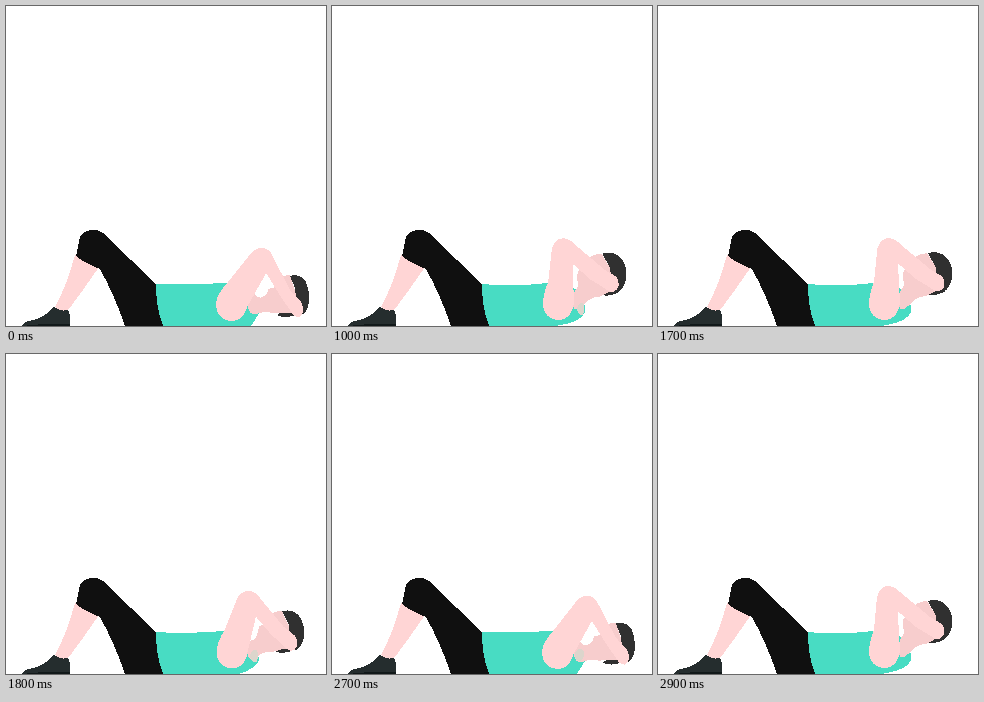
These frames come from a looping animation (320x320 px, 3.8 s). An HTML page:

```html
<!DOCTYPE html>
<html lang="en">
<meta charset="utf-8">
<title>Crunches</title>
<style>
  html, body { margin: 0; height: 100%; overflow: hidden; background: #fff; }
  svg { display: block; width: 100vw; height: 100vh; shape-rendering: crispEdges; }
</style>
<svg viewBox="0 0 320 320">
  <g id="body"></g>
  <path fill="#252d2e" d="M16 319Q20 315 27 314Q35 312 40 308L48 300Q52 306 62 303Q65 311 64 320H16Z"/>
  <path fill="#111819" d="M16 320Q40 317 64 318V320Z"/>
  <path fill="#ffd5d5" d="M69 249L93 261Q78 283 63 303Q56 307 49 301Q61 279 69 249Z"/>
  <path fill="#101010" d="M70 250L74 231Q78 224 88 224Q95 224 100 230L150 278Q150 302 157 320H119Q108 288 94 263Q80 258 70 250Z"/>
</svg>
<script>
const LOOP = 3800;
const skin = '#ffd5d5', face = '#f7cdcd', cap = '#303030';

// fill, path lying down, path curled up, shown only while moving
const parts = [
  [cap,
    'M271 309Q276 304 285 306L290 309Q278 313 271 309Z',
    'M268 288Q274 281 283 282L287 285Q277 291 268 288Z'],
  ['#48dcc3',
    'M149 278Q185 279 218 277Q235 276 241 286Q252 300 253 307Q249 314 245 320L157 320Q149 303 149 278Z',
    'M149 278Q182 281 216 277Q236 276 243 283Q253 288 253 306Q248 317 222 320L157 320Q149 303 149 278Z'],
  [face,
    'M242 300Q243 290 249 288Q253 294 258 290Q262 288 262 283L270 281Q272 269 284 269L291 290L286 307Q275 306 267 307Q257 305 251 308Q243 310 242 300Z',
    'M241 300Q240 290 243 284Q248 279 245 274Q244 268 246 264L252 258Q257 247 269 247L279 263L281 283Q274 287 268 290Q260 290 253 297Q243 308 241 300Z'],
  [cap,
    'M284 270Q294 267 300 276Q305 288 302 301Q300 307 294 310L291 300L289 282Z',
    'M270 247Q278 244 286 249Q296 257 294 272Q292 282 285 286L279 280L278 262Z'],
  ['#dcd5cc',
    'M243 300Q244 294 250 295Q254 299 250 306Q243 309 243 300Z',
    'M245 302Q247 296 251 297Q254 302 251 309Q246 310 245 302Z', true],
  [skin,
    'M250 246Q258 238 265 247L284 284L295 296Q300 305 294 311Q288 312 284 304L275 291L257 262Z',
    'M226 236Q234 229 242 238L272 263L284 270Q289 279 284 283Q279 288 273 282L258 273L236 254Z'],
  [skin,
    'M210 297Q211 288 222 276L246 246Q256 238 264 246Q268 252 262 264L241 301Q238 314 226 315Q210 314 210 297Z',
    'M211 298Q211 288 216 276L218 243Q222 228 238 234Q239 246 240 264L242 296Q240 313 227 314Q212 313 211 298Z'],
];

// start time, curl amount, moving
const steps = [
  [0, 0, 0],
  [800, .02, 1], [900, .5, 1], [1000, .97, 1], [1100, .99, 0], [1200, 1, 0],
  [1700, .99, 0], [1800, .55, 1], [1900, .1, 1], [2000, 0, 0],
  [2700, .02, 1], [2800, .55, 1], [2900, 1, 0],
];

const body = document.getElementById('body');
const paths = parts.map(([fill]) => {
  const path = document.createElementNS('http://www.w3.org/2000/svg', 'path');
  path.setAttribute('fill', fill);
  return body.appendChild(path);
});

function mix(from, to, amount) {
  const ends = to.match(/\d+/g);
  let i = 0;
  return from.replace(/\d+/g, n => +n + (ends[i++] - n) * amount);
}

// The up path of the upper arm needs as many points as the down path.
parts[6][2] = 'M211 298Q211 288 216 276L219 243Q222 231 232 232Q241 234 240 262L242 296Q240 313 227 314Q212 313 211 298Z';

function draw(now) {
  const time = now % LOOP;
  const [, curl, moving] = steps.filter(step => step[0] <= time).pop();
  parts.forEach(([, down, up, blur], i) => {
    paths[i].setAttribute('d', mix(down, up, curl));
    paths[i].setAttribute('opacity', blur && !moving ? 0 : 1);
  });
}

function loop() {
  draw(performance.now());
  requestAnimationFrame(loop);
}
loop();
</script>
</html>
```
